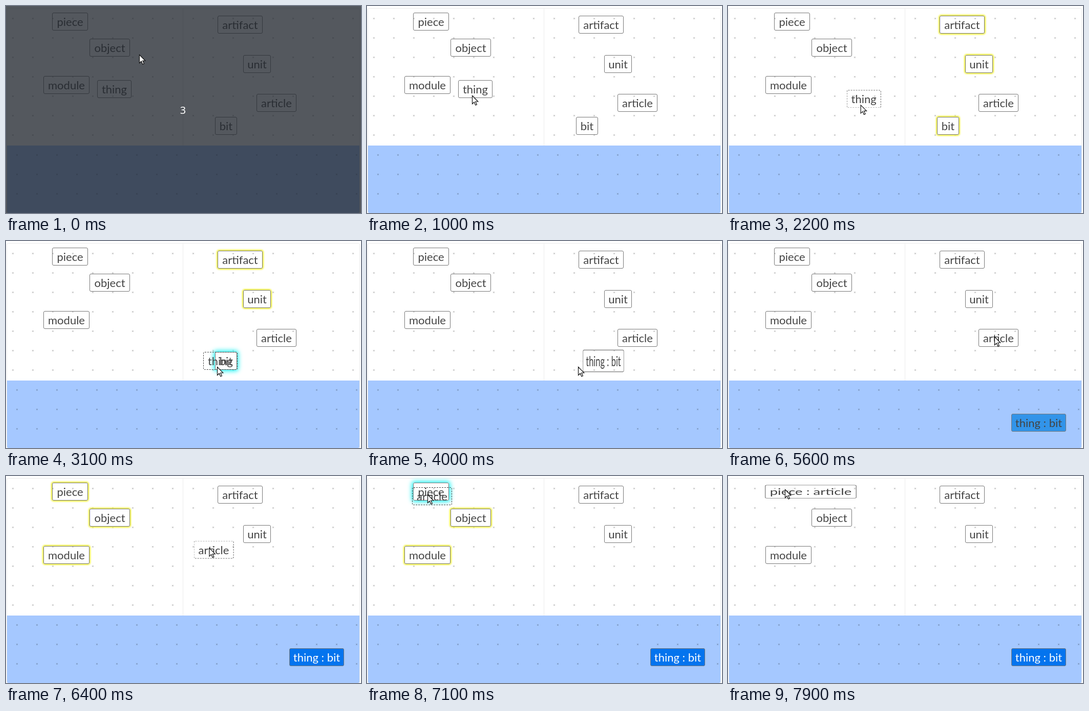
Recreate the animation shown at these times as an HTML page. Size 693 by 405 pixels, loop 8 s.

```html
<!DOCTYPE html>
<html lang="en">
<head>
<meta charset="utf-8">
<title>Word pairs</title>
<style>
  html, body { margin: 0; width: 100%; height: 100%; overflow: hidden; background: #fff; }
  #stage { position: absolute; left: 0; top: 0; width: 693px; height: 405px; overflow: hidden; }
  svg { position: absolute; left: 0; top: 0; overflow: visible; }
  .box {
    position: absolute; left: 0; top: 0; height: 35px; box-sizing: border-box;
    border: 1px solid #777; border-radius: 3px;
    font: 22px/33px Lato, "Open Sans", sans-serif; color: #444;
    text-align: center; white-space: nowrap;
  }
  .near { box-shadow: 0 0 3px 2px #f3f33a; }
  .over { box-shadow: 0 0 9px 3px #2ff5f5; }
  .drag { border: 1px dashed #444; }
  #shade {
    position: absolute; inset: 0; background: rgba(33, 38, 46, .77);
    color: #fff; font: 20px/405px "Noto Sans", sans-serif; text-align: center;
  }
  #shade span { position: absolute; left: 0; width: 691px; top: 1px; }
</style>
</head>
<body>
<div id="stage">
  <svg width="693" height="405">
    <defs>
      <path id="x" d="M-1.5-1.5 1.5 1.5M1.5-1.5-1.5 1.5" stroke="#000" stroke-opacity=".27" stroke-width="1"/>
    </defs>
    <path d="M1.5 405V7.5Q1.5 4.5 4.5 4.5H687.5Q690.5 4.5 690.5 7.5V405M345.5 5V273" fill="none" stroke="#ebebeb"/>
    <path d="M2 273H690V402Q690 405 687 405H5Q2 405 2 402Z" fill="#a5c8ff"/>
    <g id="grid"></g>
  </svg>
  <div id="words"></div>
  <div id="shade"><span>3</span></div>
  <svg width="693" height="405">
    <path id="cursor" d="M.5.5V16.5L4.2 13 6.8 19 9.4 17.9 6.8 12H11.8Z" fill="#fff" stroke="#111" stroke-width="1.2"/>
  </svg>
</div>
<script>
const LOOP = 8000, STEP = 100;
const $ = id => document.getElementById(id);
const clamp = v => Math.max(0, Math.min(1, v));
const span = (t, a, b) => clamp((t - a) / (b - a));
const mix = (a, b, u) => a + (b - a) * u;
const smooth = u => u * u * (3 - 2 * u);

// CSS "ease": cubic-bezier(.25, .1, .25, 1)
function ease(x) {
  let lo = 0, hi = 1;
  for (let i = 0; i < 24; i++) {
    const s = (lo + hi) / 2, r = 1 - s;
    if (.75 * r * s + s * s * s < x) lo = s; else hi = s;
  }
  const s = lo, r = 1 - s;
  return .3 * r * r * s + 3 * r * s * s + s * s * s;
}

// Interpolates rows of [time, x, y]
function track(rows, t, curve) {
  let i = 0;
  while (i < rows.length - 2 && t >= rows[i + 1][0]) i++;
  const [a, b] = [rows[i], rows[i + 1]];
  const u = curve(span(t, a[0], b[0]));
  return [mix(a[1], b[1], u), mix(a[2], b[2], u)];
}

const RUBBER = [[0, 1, 1], [.3, 1.25, .75], [.4, .75, 1.25], [.5, 1.15, .85],
  [.65, .95, 1.05], [.75, 1.05, .95], [1, 1, 1]];
const MOUSE = [[0, 260, 95], [500, 205, 175], [1800, 205, 175], [3000, 412, 246],
  [4050, 412, 246], [4700, 520, 187], [6050, 520, 187], [7000, 118, 36],
  [7500, 118, 36], [7900, 111, 26]];

const boxes = {};
function addBox(text, x, y, w, side) {
  const el = document.createElement("div");
  el.className = "box";
  el.textContent = text;
  el.style.width = w + "px";
  $("words").append(el);
  boxes[text] = { el, x, y, side };
}
addBox("piece", 90, 13, 70, 0);
addBox("object", 163, 64, 79, 0);
addBox("module", 73, 137, 90, 0);
addBox("artifact", 413, 19, 88, 1);
addBox("unit", 463, 96, 54, 1);
addBox("bit", 408, 217, 43, 1);
addBox("thing : bit", 408, 217, 107, 2);
addBox("piece : article", 90, 13, 143, 2);
addBox("thing", 178, 145, 67, 0);
addBox("article", 489, 172, 78, 1);

const pairs = [
  { word: "thing", goal: "bit", made: "thing : bit", side: 1, grab: 1700, touch: 2800, drop: 3500, dx: 27, dy: 29 },
  { word: "article", goal: "piece", made: "piece : article", side: 0, grab: 6000, touch: 6900, drop: 7500, dx: 30, dy: 14 }
];

function addCrosses(x0, x1, y0, y1) {
  for (let y = y0; y < y1; y += 38)
    for (let x = x0; x < x1; x += 39)
      $("grid").insertAdjacentHTML("beforeend", `<use href="#x" x="${x}" y="${y}"/>`);
}
addCrosses(13.5, 345, 24.5, 272);
addCrosses(365.5, 690, 24.5, 272);
addCrosses(21.5, 690, 291.5, 404);

function place(box, x, y, sx = 1, sy = 1) {
  box.el.style.transform = `translate(${x}px, ${y}px) scale(${sx}, ${sy})`;
}
const show = (box, on) => { box.el.style.visibility = on ? "visible" : "hidden"; };

function drawPair(p, t, mx, my) {
  const word = boxes[p.word], goal = boxes[p.goal], made = boxes[p.made];
  const held = t >= p.grab, dropped = t >= p.drop;

  const size = 1 - span(t, p.drop + 100, p.drop + 560);
  word.el.className = held ? "box drag" : "box";
  word.el.style.opacity = size;
  if (held) place(word, mx - p.dx, my - p.dy, size, size);

  if (held && !dropped) {
    for (const b of Object.values(boxes))
      if (b.side === p.side && b !== word) b.el.className = "box near";
    if (t >= p.touch) goal.el.className = "box over";
  }
  show(goal, !dropped);
  show(made, dropped);
  const [sx, sy] = track(RUBBER, (t - p.drop - 100) / 1000, ease);
  place(made, made.x, made.y, sx, sy);
}

function drawFall(t) {
  const b = boxes["thing : bit"];
  const lit = span(t, 4500, 4700), done = span(t, 5900, 6200);
  if (t >= 4680) {
    const u = ease(span(t, 4680, 5430));
    place(b, mix(408, 553, u), mix(217, 338, u) - Math.round(done));
  }
  b.el.style.background = `rgba(${mix(50, 4, done)}, ${mix(148, 116, done)}, ${mix(233, 238, done)}, ${lit})`;
  const ink = mix(68, 255, done);
  b.el.style.color = `rgb(${ink}, ${ink}, ${ink})`;
}

function draw(t) {
  const [mx, my] = track(MOUSE, t, smooth);
  for (const b of Object.values(boxes)) {
    b.el.className = "box";
    place(b, b.x, b.y);
  }
  for (const p of pairs) drawPair(p, t, mx, my);
  drawFall(t);
  $("shade").style.opacity = 1 - span(t, 0, 300);
  $("cursor").setAttribute("transform", `translate(${mx} ${my})`);
}

const start = performance.now();
function tick() {
  const t = (performance.now() - start) % LOOP;
  draw(Math.floor(t / STEP) * STEP);
  requestAnimationFrame(tick);
}
tick();
</script>
</body>
</html>
```
